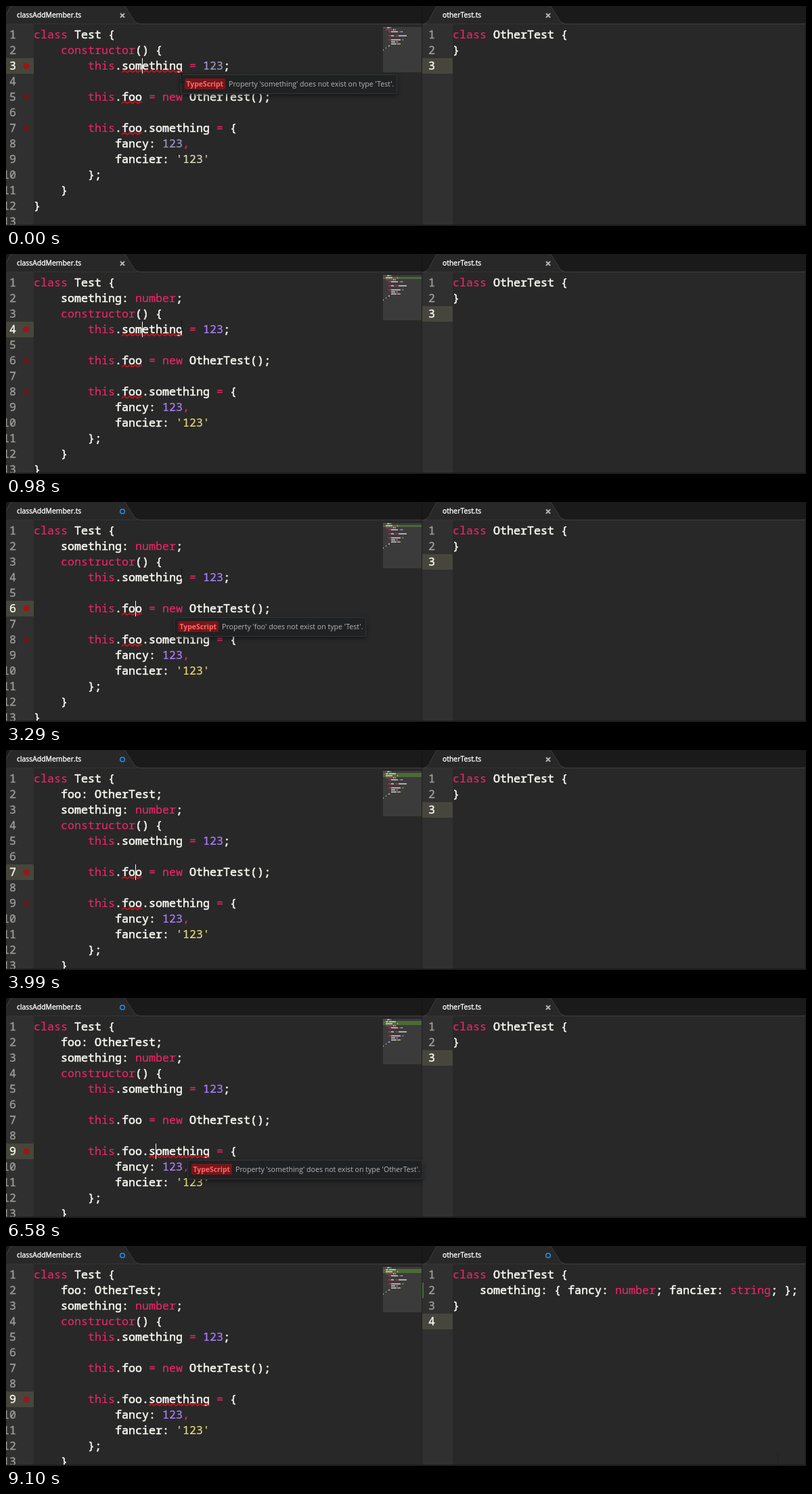
These frames come from a looping animation (1182x325 px, 9170 ms). An HTML page with a canvas:

```html
<!DOCTYPE html>
<html>
<head>
<meta charset="utf-8">
<style>
  html, body { margin: 0; width: 100%; height: 100%; overflow: hidden; background: #282828; }
  canvas { display: block; }
</style>
</head>
<body>
<canvas id="stage" width="1182" height="325"></canvas>
<script>
const ctx = document.getElementById('stage').getContext('2d');
const LOOP = 9170, TOP = 31, ROW = 23, COL = 10, CODE_X = 41;
const MONO = '500 16.67px "Noto Sans Mono", "DejaVu Sans Mono", monospace';
const UI_FAMILY = '"Open Sans", "Noto Sans", sans-serif';
const UI = '10.4px ' + UI_FAMILY;
const WHITE = '#f8f8f2', PINK = '#ea2665', PURPLE = '#ae81ff', YELLOW = '#e6db74';

const baseCode = [
  'class Test {',
  '    constructor() {',
  '        this.something = 123;',
  '',
  '        this.foo = new OtherTest();',
  '',
  '        this.foo.something = {',
  '            fancy: 123,',
  "            fancier: '123'",
  '        };',
  '    }',
  '}',
  ''
];
const withMembers = (code, members) => [code[0], ...members.map(m => '    ' + m), ...code.slice(1)];
const leftVersions = [
  [0, baseCode],
  [910, withMembers(baseCode, ['something: number;'])],
  [3920, withMembers(baseCode, ['foo: OtherTest;', 'something: number;'])]
];
const otherCode = ['class OtherTest {', '}', ''];
const rightVersions = [
  [0, otherCode],
  [7420, withMembers(otherCode, ['something: { fancy: number; fancier: string; };'])]
];

// Timelines: [start ms, value]
const cursorPlaces = [
  [0, [3, 16]], [910, [4, 16]], [2170, [5, 0]], [2240, [6, 15]], [3920, [7, 15]],
  [4830, [8, 0]], [4970, [9, 15]], [5460, [9, 16]], [5600, [9, 17]], [5810, [9, 18]]
];
const cursorBlink = [
  [0, 1], [280, 0], [910, 1], [1330, 0], [1750, 1], [2100, 0], [2240, 1], [2940, 0],
  [3290, 1], [3430, 0], [3920, 1], [4340, 0], [4830, 1], [6230, 0], [6580, 1],
  [6930, 0], [7420, 1], [7700, 0], [8050, 1], [8400, 0], [8750, 1], [9100, 0]
];
// Errors: [row, column, length]
const errorSets = [
  [0, [[3, 13, 9], [5, 13, 3], [7, 13, 3]]],
  [910, [[4, 13, 9], [6, 13, 3], [8, 13, 3]]],
  [1330, [[6, 13, 3], [8, 13, 3]]],
  [3920, [[7, 13, 3], [9, 13, 3]]],
  [4340, [[9, 17, 9]]]
];
const missing = (name, type) => `Property '${name}' does not exist on type '${type}'.`;
// Tooltips: [x, row above, width, message]
const onOther = x => [x, 9, 348, missing('something', 'OtherTest')];
const tooltips = [
  [0, [258, 3, 320, missing('something', 'Test')]], [910, null],
  [2450, [248, 6, 284, missing('foo', 'Test')]], [3920, null],
  [5110, onOther(238)], [5460, onOther(258)], [5600, onOther(268)], [7420, null]
];
const menus = [
  [0, null], [420, 'Add something to class Test'], [910, null],
  [3430, 'Add foo to class Test'], [3920, null],
  [7000, 'Add something to class OtherTest'], [7420, null]
];

const at = (timeline, t) => timeline.reduce((value, [start, v]) => t >= start ? v : value, null);
const rowTop = row => TOP + ROW * (row - 1);

function rect(x, y, w, h, color) {
  ctx.fillStyle = color;
  ctx.fillRect(x, y, w, h);
}
// A thin outline of the same colour makes the strokes heavier.
function text(s, x, y, color, font, { align = 'left', heavier = 0 } = {}) {
  ctx.font = font;
  ctx.textAlign = align;
  ctx.fillStyle = ctx.strokeStyle = color;
  ctx.fillText(s, x, y);
  if (heavier) {
    ctx.lineWidth = heavier;
    ctx.lineJoin = 'round';
    ctx.strokeText(s, x, y);
  }
}
function line(points, color, width = 1) {
  ctx.beginPath();
  points.forEach(([x, y]) => ctx.lineTo(x, y));
  ctx.strokeStyle = color;
  ctx.lineWidth = width;
  ctx.stroke();
}
function panel(x, y, w, h, r, fill, stroke) {
  ctx.beginPath();
  ctx.roundRect(x, y, w, h, r);
  ctx.fillStyle = fill;
  ctx.fill();
  if (stroke) {
    ctx.strokeStyle = stroke;
    ctx.lineWidth = 1;
    ctx.stroke();
  }
}
function floatingPanel(x, y, w, h, fill) {
  ctx.save();
  ctx.shadowColor = 'rgba(0,0,0,.5)';
  ctx.shadowBlur = 6;
  ctx.shadowOffsetY = 3;
  panel(x, y, w, h, 3, fill);
  ctx.restore();
  panel(x, y, w, h, 3, fill, '#343637');
}

function tokenColor(token, muted) {
  if (/^(class|constructor|this|new|number|string|=|,)$/.test(token)) return PINK;
  if (/^\d/.test(token)) return muted ? '#a598c4' : PURPLE;
  if (token[0] === "'") return muted ? '#dedac0' : YELLOW;
  return WHITE;
}
function eachToken(code, visit) {
  code.forEach((source, i) => {
    for (const m of source.matchAll(/'[^']*'|\w+|[^\s\w]/g)) visit(m[0], m.index, i + 1);
  });
}

function tab(x, label, modified) {
  const edge = [[x - 27, 26.5], [x - 21, 23], [x - 10, 2], [x - 6, -1], [x + 157, -1],
                [x + 161, 2], [x + 174, 23], [x + 181, 26.5]];
  ctx.beginPath();
  edge.forEach(p => ctx.lineTo(...p));
  ctx.fillStyle = '#282828';
  ctx.fill();
  line(edge, '#404040');
  text(label, x, 17, '#fff', UI, { heavier: 0.35 });
  const cx = x + 156, cy = 14;
  if (modified) {
    ctx.beginPath();
    ctx.arc(cx, cy, 3.3, 0, 7);
    ctx.strokeStyle = '#2a8fe0';
    ctx.lineWidth = 1.6;
    ctx.stroke();
  } else {
    line([[cx - 3, cy - 3], [cx + 3, cy + 3]], '#b4b4b4', 2);
    line([[cx + 3, cy - 3], [cx - 3, cy + 3]], '#b4b4b4', 2);
  }
}

function pane(x, gutter, numberX, code, activeRow, muted) {
  rect(x, 27, gutter, 298, '#303030');
  rect(x, rowTop(activeRow), gutter, ROW, '#47463c');
  code.forEach((_, i) => {
    const color = i + 1 === activeRow ? WHITE : '#9a9b96';
    text(i + 1, numberX, rowTop(i + 1) + 17, color, MONO, { align: 'right', heavier: 0.4 });
  });
  eachToken(code, (token, col, row) => {
    const color = tokenColor(token, muted);
    text(token, x + gutter + col * COL, rowTop(row) + 17, color, MONO,
         { heavier: color === WHITE ? 0.6 : 0.2 });
  });
}

function minimap(code, added) {
  rect(557, 31, 57, 67, '#3b3b3b');
  rect(557, 34, 57, 3 * added, '#4c6a35');
  ctx.globalAlpha = 0.6;
  eachToken(code, (token, col, row) =>
    rect(557 + col, 28 + 3 * row, token.length, 2, tokenColor(token)));
  ctx.globalAlpha = 1;
}

function errorMark([row, col, length], activeRow) {
  const y = rowTop(row), x = CODE_X + col * COL, wave = [];
  for (let dx = 0; dx <= length * COL; dx++) {
    wave.push([x + dx, y + 19.5 + 1.3 * Math.cos(dx * Math.PI / 4)]);
  }
  line(wave, '#d3101c', 1.7);
  ctx.beginPath();
  ctx.arc(30, y + 11.5, 4.5, 0, 7);
  ctx.fillStyle = row === activeRow ? '#9c1518' : '#621a1b';
  ctx.fill();
}

function tooltip([x, row, width, message]) {
  const y = rowTop(row + 1) + 1;
  floatingPanel(x + 0.5, y + 0.5, width - 1, 28, '#202122');
  panel(x + 6, y + 6, 60, 16, 2, '#76161a');
  text('TypeScript', x + 8.5, y + 18, '#ff6a68', `bold ${UI}`);
  text(message, x + 71, y + 18, '#b6b8b8', '10.6px ' + UI_FAMILY);
}

function menu(label, row, x) {
  const y = rowTop(row + 1), width = label.length * COL + 20;
  floatingPanel(x + 0.5, y + 0.5, width, 80, '#232425');
  panel(x + 5.5, y + 5.5, width - 10, 30, 3, '#1a1b1c', '#3f4244');
  rect(x + 11, y + 9, 1, ROW, WHITE);
  rect(x + 5, y + 41, width - 9, 34, '#3b3d3f');
  text(label, x + 10, y + 64, WHITE, MONO, { heavier: 0.4 });
}

function pointer(t) {
  if (t >= 3920 && t < 8050) return;
  const progress = t < 8050 ? 0 : Math.min(1, (Math.floor((t - 8050) / 70) + 1) / 11);
  const eased = progress * progress * (3 - 2 * progress);
  const x = Math.round(259 + 881 * eased) + 0.5, y = Math.round(106 + 208 * eased);
  const color = progress === 1 ? '#222' : '#141414';
  line([[x, y - 6], [x, y + 6]], color);
  line([[x - 2, y - 6.5], [x + 2, y - 6.5]], color);
  line([[x - 2, y + 6.5], [x + 2, y + 6.5]], color);
}

function draw(t) {
  const left = at(leftVersions, t), right = at(rightVersions, t);
  const [row, col] = at(cursorPlaces, t);
  const cursorX = CODE_X + col * COL;

  rect(0, 0, 1182, 325, '#282828');
  rect(0, 0, 1182, 27, '#1a1a1a');
  rect(0, 26, 1182, 1, '#404040');
  tab(16, 'classAddMember.ts', t >= 1260);
  rect(614, 0, 1, 27, '#111');
  tab(645, 'otherTest.ts', t >= 7700);

  pane(0, 41, 15, left, row, t < 910);
  pane(615, 45, 634, right, right.length);
  rect(614, 27, 1, 298, '#1f1f1f');
  if (t >= 8400) rect(615, 54, 2, ROW, '#41713a');
  minimap(left, left.length - baseCode.length);

  at(errorSets, t).forEach(error => errorMark(error, row));
  if (at(cursorBlink, t)) rect(cursorX, rowTop(row), 1, ROW, WHITE);

  const tip = at(tooltips, t), label = at(menus, t);
  if (tip) tooltip(tip);
  if (label) menu(label, row, cursorX);
  pointer(t);

  rect(1180, 27, 2, 298, '#202020');
  rect(0, 323, 1182, 2, '#23181c');
}

function tick() {
  draw(performance.now() % LOOP);
  requestAnimationFrame(tick);
}
tick();
</script>
</body>
</html>
```
